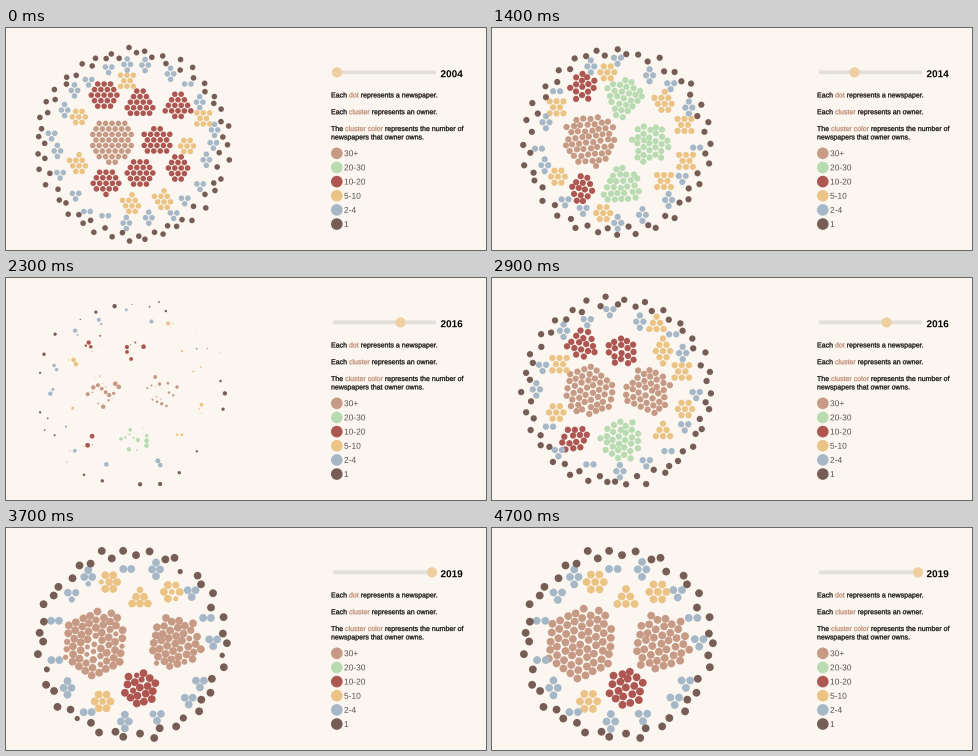
Write a matplotlib script that moves like this. It is 480 px wide and 222 px high and loops after 4800 ms.

```python
import numpy as np
import matplotlib.pyplot as plt
from matplotlib.animation import FuncAnimation
from matplotlib.colors import to_rgb
from matplotlib.patches import Circle, FancyBboxPatch, PathPatch
from matplotlib.textpath import TextPath
from matplotlib.transforms import Affine2D

W, H, DPI = 480, 222, 100
PT = 72 / DPI
FRAMES, STEP = 48, 100
GROW, STAGGER = 350, 500  # ms
BG, INK, ACCENT = "#fbf6ef", "#161412", "#c08d78"
COLORS = {"30+": "#c69a85", "20-30": "#b8dbb1", "10-20": "#ae5752",
          "5-10": "#ebc485", "2-4": "#a6b8c8", "1": "#765d55"}

plt.rcParams["toolbar"] = "None"


def smooth(t):
    t = np.clip(t, 0, 1)
    return t * t * (3 - 2 * t)


def hex_pack(n, gap, angle=0):
    """The n hexagonal grid points nearest to the middle, centred on it."""
    j, i = np.mgrid[-7:8, -7:8]
    pts = np.c_[(i + j % 2 / 2).ravel(), 0.866 * j.ravel()] * gap
    mid = np.array([0.5, 0.28]) * gap if n % 2 == 0 or n == 3 else np.zeros(2)
    dist = np.hypot(*(pts - mid).T).round(3)
    pts = pts[np.argsort(dist, kind="stable")[:n]]
    c, s = np.cos(angle), np.sin(angle)
    return (pts - pts.mean(axis=0)) @ np.array([[c, s], [-s, c]])


def ring(n, radius, center, wobble, rng):
    """Points spread around a circle, alternately nearer and farther."""
    k = np.arange(n)
    a = 2 * np.pi * (k + rng.uniform(-0.25, 0.25, n)) / n
    r = radius + wobble * (-1.0) ** k + rng.normal(0, 1.5, n)
    return np.array(center) + np.c_[np.cos(a), np.sin(a)] * r[:, None]


def relax(pos, rad, give, steps=150):
    """Push overlapping circles apart; `give` says how freely each moves."""
    home = pos.copy()
    reach = rad[:, None] + rad[None]
    for _ in range(steps):
        d = pos[:, None] - pos[None]
        dist = np.hypot(d[..., 0], d[..., 1]) + 1e-6
        push = np.clip(reach - dist, 0, None) / dist
        np.fill_diagonal(push, 0)
        pos = pos + give[:, None] * (push[..., None] * d).sum(axis=1)
        pos += 0.03 * (home - pos)
    return pos


class Scene:
    """One year: big owners at given places, small ones on two outer rings."""

    def __init__(self, year, start, knob, dot, gap, center, radius,
                 big, middle, small, single):
        rng = np.random.default_rng(year)
        self.year, self.start, self.knob, self.dot = str(year), start, knob, dot

        groups = [(size, (x, y), n) for size, items in big.items()
                  for x, y, n in items]
        groups += [("5-10", p, rng.integers(6, 10)) for p in middle]
        groups += [("2-4", p, rng.integers(2, 5))
                   for p in ring(small, radius - 13, center, 2, rng)]
        groups += [("1", p, 1) for p in ring(single, radius, center, 3, rng)]
        sizes, places, counts = zip(*groups)

        counts = np.array(counts)
        places = relax(np.array(places, float), 0.54 * gap * np.sqrt(counts),
                       np.where(counts > 9, 0.02, 0.3))
        offsets = []
        for n in counts:
            loose = n > 9 and start > 0
            pts = hex_pack(n, gap, rng.uniform(0, 1) if loose else 0)
            offsets.append(pts + rng.normal(0, 0.4, pts.shape) * loose)

        self.home = np.repeat(places, counts, axis=0)
        self.offset = np.vstack(offsets)
        self.colors = np.repeat([to_rgb(COLORS[s]) for s in sizes], counts, axis=0)
        self.delay = rng.uniform(0, STAGGER, len(self.home))

    def at(self, ms):
        """Dot places and radii; the first scene is already at rest."""
        age = ms - self.start if self.start else np.inf
        spread = 0.68 + 0.32 * smooth((age - 300) / 600)
        return (self.home + self.offset * spread,
                self.dot * smooth((age - self.delay) / GROW))


SCENES = [
    Scene(2004, 0, 331, 2.8, 6.4, (127, 116), 92,
          {"30+": [(106, 113, 44)],
           "10-20": [(98, 67, 19), (134, 76, 18), (172, 78, 16), (151, 113, 20),
                     (172, 140, 14), (134, 145, 19), (100, 154, 17)]},
          [(121, 49), (201, 94), (181, 118), (71, 88), (72, 136), (125, 176),
           (157, 172)],
          small=23, single=70),
    Scene(2014, 600, 362.5, 3.1, 7.1, (125, 115), 90,
          {"30+": [(98, 112, 52)],
           "20-30": [(132, 69, 27), (158, 115, 29), (130, 158, 27)],
           "10-20": [(91, 58, 15), (90, 161, 14)]},
          [(117, 40), (172, 73), (194, 91), (194, 133), (172, 153), (114, 187),
           (64, 147), (63, 80)],
          small=16, single=56),
    Scene(2016, 2050, 394.5, 3.15, 7.2, (125, 113), 91,
          {"30+": [(97, 113, 46), (156, 113, 38)],
           "20-30": [(129, 162, 30)],
           "10-20": [(90, 66, 16), (130, 73, 17), (82, 161, 14)]},
          [(162, 46), (171, 73), (62, 87), (64, 135), (190, 90), (193, 131),
           (171, 154)],
          small=16, single=60),
    Scene(2019, 3000, 426, 3.9, 8.6, (126, 116), 92,
          {"30+": [(89, 115, 63), (169, 115, 41)],
           "10-20": [(134, 160, 19)]},
          [(103, 54), (134, 71), (170, 64), (93, 176)],
          small=15, single=46),
]

fig = plt.figure(figsize=(W / DPI, H / DPI), dpi=DPI, facecolor=BG)
ax = fig.add_axes([0, 0, 1, 1])
ax.set(xlim=(0, W), ylim=(H, 0))
ax.axis("off")


def glyphs(x, y, s, size, weight="normal"):
    """Outline of a line of text whose baseline starts at (x, y)."""
    font = {"family": "Liberation Sans", "weight": weight}
    path = TextPath((0, 0), s, size=size, prop=font)
    return Affine2D().scale(1, -1).translate(x, y).transform_path(path)


def label(x, y, s, size, color=INK, weight="normal", lw=0.0):
    return ax.add_patch(PathPatch(glyphs(x, y, s, size, weight),
                                  fc=color, ec=color, lw=lw))


def advance(s, size):
    def right(t):
        return glyphs(0, 0, t, size).get_extents().x1
    return right(s + "l") - right("l")


def rich_line(y, *parts, size=7.03):
    """Draw pieces of text one after another, every second one accented."""
    x = 325
    for k, s in enumerate(parts):
        label(x, y, s, size, ACCENT if k % 2 else INK, lw=0.2)
        x += advance(s, size)


# Slider
ax.add_patch(FancyBboxPatch((327, 42.4), 103, 3.8, lw=0, fc="#e2e0dd",
                            boxstyle="round,pad=0,rounding_size=1"))
knob = ax.add_patch(Circle((331, 44.4), 5.1, lw=0, fc="#efcf9f"))
year = label(434.5, 49.2, "2004", 10, "black", "bold")

# Explanation
rich_line(69.4, "Each ", "dot", " represents a newspaper.")
rich_line(86.2, "Each ", "cluster", " represents an owner.")
rich_line(103, "The ", "cluster color", " represents the number of")
rich_line(111.4, "newspapers that owner owns.")

# Legend
for k, (name, color) in enumerate(COLORS.items()):
    y = 125.3 + 14.15 * k
    ax.add_patch(Circle((330.8, y), 5.8, lw=0, fc=color))
    label(338, y + 2.9, name, 8.4, "#555250")

dots = ax.scatter([], [], linewidths=0)


def draw(i):
    ms = i * STEP
    scene = [s for s in SCENES if s.start <= ms][-1]
    pos, r = scene.at(ms)
    dots.set_offsets(pos)
    dots.set_sizes((2 * r * PT) ** 2)
    dots.set_facecolors(scene.colors)
    knob.center = (scene.knob, 44.4)
    year.set_path(glyphs(434.5, 49.2, scene.year, 10, "bold"))
    return dots, knob, year


anim = FuncAnimation(fig, draw, frames=FRAMES, interval=STEP, repeat=True,
                     repeat_delay=0, blit=False)
plt.show()
```
